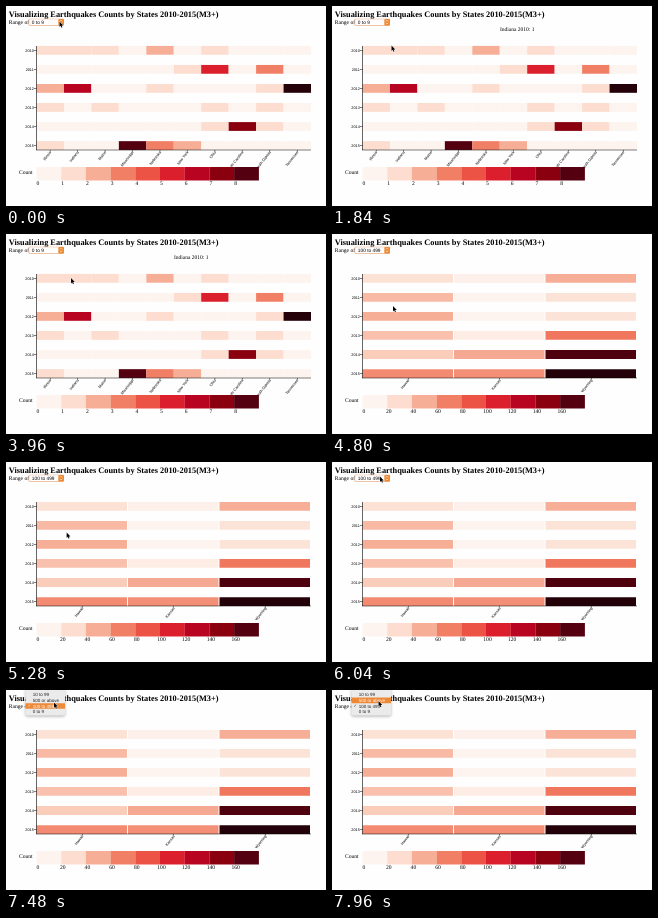
These frames come from a looping animation (320x200 px, 8 s). An HTML page with a canvas:

```html
<!DOCTYPE html>
<html lang="en">
<head>
<meta charset="utf-8">
<title>Earthquake heatmap</title>
<style>
html, body { margin: 0; width: 100%; height: 100%; overflow: hidden; background: #fefefe; }
canvas { display: block; width: 320px; height: 200px; }
</style>
</head>
<body>
<canvas id="stage"></canvas>
<script>
const LOOP = 8000;
const SERIF = '"Liberation Serif", serif';
const SANS = '"Liberation Sans", sans-serif';
const REDS = ['#fdf4ef', '#fcddcf', '#f7ae97', '#f17f65', '#ec5344', '#db1f2c', '#b80420', '#8a000f', '#540010', '#240008'];
const LEFT = 30.5, RIGHT = 305, TOP = 39.9, ROW = 19.05, CELL = 8.8;

// Each row lists one year; a value is the cell's level in REDS.
const small = {
  range: '0 to 9', step: 1, gap: 0,
  states: ['Illinois', 'Indiana', 'Maine', 'Mississippi', 'Nebraska', 'New York', 'Ohio',
    'South Carolina', 'South Dakota', 'Tennessee'],
  rows: ['1110201000', '0000015030', '2600100019', '1010001010', '0000001710', '1008320000']
};
const large = {
  range: '100 to 499', step: 20, gap: 1,
  states: ['Hawaii', 'Kansas', 'Wyoming'],
  rows: [[.8, .2, 2], [1.75, 0, .75], [2, 0, .75], [1.6, .3, 3.2], [1.35, 2.1, 8.1], [2.75, 2.65, 9]]
};
const options = ['10 to 99', '500 or above', '100 to 499', '0 to 9'];

// Cursor keys: time, x, y
const path = [[0, 53.5, 15.5], [1160, 53.5, 15.5], [1720, 59.5, 38], [1840, 59.5, 39.5], [2600, 62, 42],
  [3240, 62, 42], [3960, 65, 44], [4000, 48, 14], [4400, 48, 14], [4800, 61, 72], [5200, 61, 72],
  [6040, 48, 14.5], [7040, 48, 14.5], [7280, 48, 12.5], [7440, 48, 12.5], [7960, 46.5, 11], [8000, 46.5, 11]];

const canvas = document.getElementById('stage');
const ctx = canvas.getContext('2d');
const density = window.devicePixelRatio || 1;
canvas.width = 320 * density;
canvas.height = 200 * density;

function rect(x, y, w, h, color, radius = 0) {
  ctx.fillStyle = color;
  ctx.beginPath();
  ctx.roundRect(x, y, w, h, radius);
  ctx.fill();
}

function text(string, x, y, size, family = SERIF, align = 'left', color = '#000', weight = '') {
  ctx.font = `${weight} ${size}px ${family}`;
  ctx.textRendering = 'geometricPrecision';
  ctx.textAlign = align;
  ctx.fillStyle = color;
  ctx.fillText(string, x, y);
}

function shade(level) {
  const low = Math.floor(level), high = Math.min(low + 1, 9);
  const channel = i => {
    const a = parseInt(REDS[low].slice(i, i + 2), 16);
    const b = parseInt(REDS[high].slice(i, i + 2), 16);
    return a + (b - a) * (level - low);
  };
  return `rgb(${channel(1)}, ${channel(3)}, ${channel(5)})`;
}

function drawChart({ states, rows, step, gap }) {
  const width = (RIGHT - LEFT) / states.length;
  rows.forEach((row, r) => {
    const y = TOP + r * ROW;
    [...row].forEach((level, c) =>
      rect(LEFT + c * width, y, width - gap, CELL, shade(+level)));
    rect(28, y + CELL / 2 - .25, 2.5, .5, '#000');
    text(2010 + r, 27.8, y + CELL / 2 + 1.3, 3.8, SANS, 'right');
  });
  rect(30, TOP, .6, 104, '#000');
  rect(30, 143.7, 275, .6, '#000');

  states.forEach((state, c) => {
    const x = LEFT + (c + .5) * width;
    rect(x - .25, 144, .5, 1.5, '#000');
    ctx.save();
    ctx.translate(x + .3, 145.6);
    ctx.rotate(-Math.PI * .29);
    text(state, 0, 1.2, 3.8, SANS, 'right');
    ctx.restore();
  });

  text('Count', 13, 168, 5.6);
  for (let i = 0; i < 9; i++) {
    const x = 30.5 + i * 24.7;
    rect(x, 161, 24.8, 13.5, REDS[i]);
    text(i * step, x + 1.5, 179, 5.6, SERIF, 'center');
  }
}

function drawSelect(label) {
  rect(22.5, 12.7, 35.5, 7, '#e9b08c', 1.2);
  rect(23.2, 13.3, 34.2, 5.8, '#fff', .8);
  rect(52.3, 12.9, 5.7, 6.5, '#ed8a35', 1);
  ctx.strokeStyle = '#fff';
  ctx.lineWidth = .6;
  ctx.beginPath();
  for (const side of [-1, 1]) {
    ctx.moveTo(54, 16.1 + side * .7);
    ctx.lineTo(55.1, 16.1 + side * 1.8);
    ctx.lineTo(56.2, 16.1 + side * .7);
  }
  ctx.stroke();
  text(label, 25.8, 17.8, 4.8, SANS);
}

function drawMenu(active) {
  ctx.save();
  ctx.shadowColor = 'rgba(0, 0, 0, .3)';
  ctx.shadowBlur = 3 * density;
  ctx.shadowOffsetY = density;
  rect(19.5, -2, 39.5, 27.5, '#ebebeb', 2);
  ctx.restore();
  options.forEach((option, i) => {
    const y = 2 + i * 5.6, color = i === active ? '#fff' : '#222';
    if (i === active) rect(19.5, y, 39.5, 5.6, '#ee8937');
    if (option === large.range) text('✓', 21.5, y + 4.2, 4, '"DejaVu Sans", sans-serif', 'left', color);
    text(option, 26.7, y + 4.3, 4.5, SANS, 'left', color);
  });
}

function cursorAt(time) {
  const i = path.findIndex(key => key[0] > time);
  const [t0, x0, y0] = path[i - 1], [t1, x1, y1] = path[i];
  if (t0 === 3960) return [x0, y0];
  const p = (time - t0) / (t1 - t0), ease = p * p * (3 - 2 * p);
  return [x0 + (x1 - x0) * ease, y0 + (y1 - y0) * ease];
}

function drawCursor(x, y) {
  const points = [[0, 0], [0, 5.4], [1.2, 4.3], [2, 6.2], [2.9, 5.8], [2.1, 4], [3.8, 4]];
  ctx.beginPath();
  points.forEach(([dx, dy]) => ctx.lineTo(x + dx, y + dy));
  ctx.closePath();
  ctx.strokeStyle = '#fff';
  ctx.lineWidth = .8;
  ctx.stroke();
  ctx.fillStyle = '#000';
  ctx.fill();
}

function draw(now) {
  const time = now % LOOP;
  const data = time < 4000 ? small : large;
  const [x, y] = cursorAt(time);
  ctx.setTransform(density, 0, 0, density, 0, 0);
  rect(0, 0, 320, 200, '#fefefe');
  text('Visualizing Earthquakes Counts by States 2010-2015(M3+)', 2.8, 10.6, 8.34, SERIF, 'left', '#000', 'bold');
  text('Range of', 2.8, 18, 5.6);
  drawChart(data);
  drawSelect(data.range);
  if (time >= 1720 && time < 4000) text('Indiana 2010: 1', 168, 25, 5.5);
  if (time >= 6160) drawMenu(y < 12.4 ? 1 : 2);
  drawCursor(x, y);
  requestAnimationFrame(() => draw(performance.now()));
}
draw(performance.now());
</script>
</body>
</html>
```
